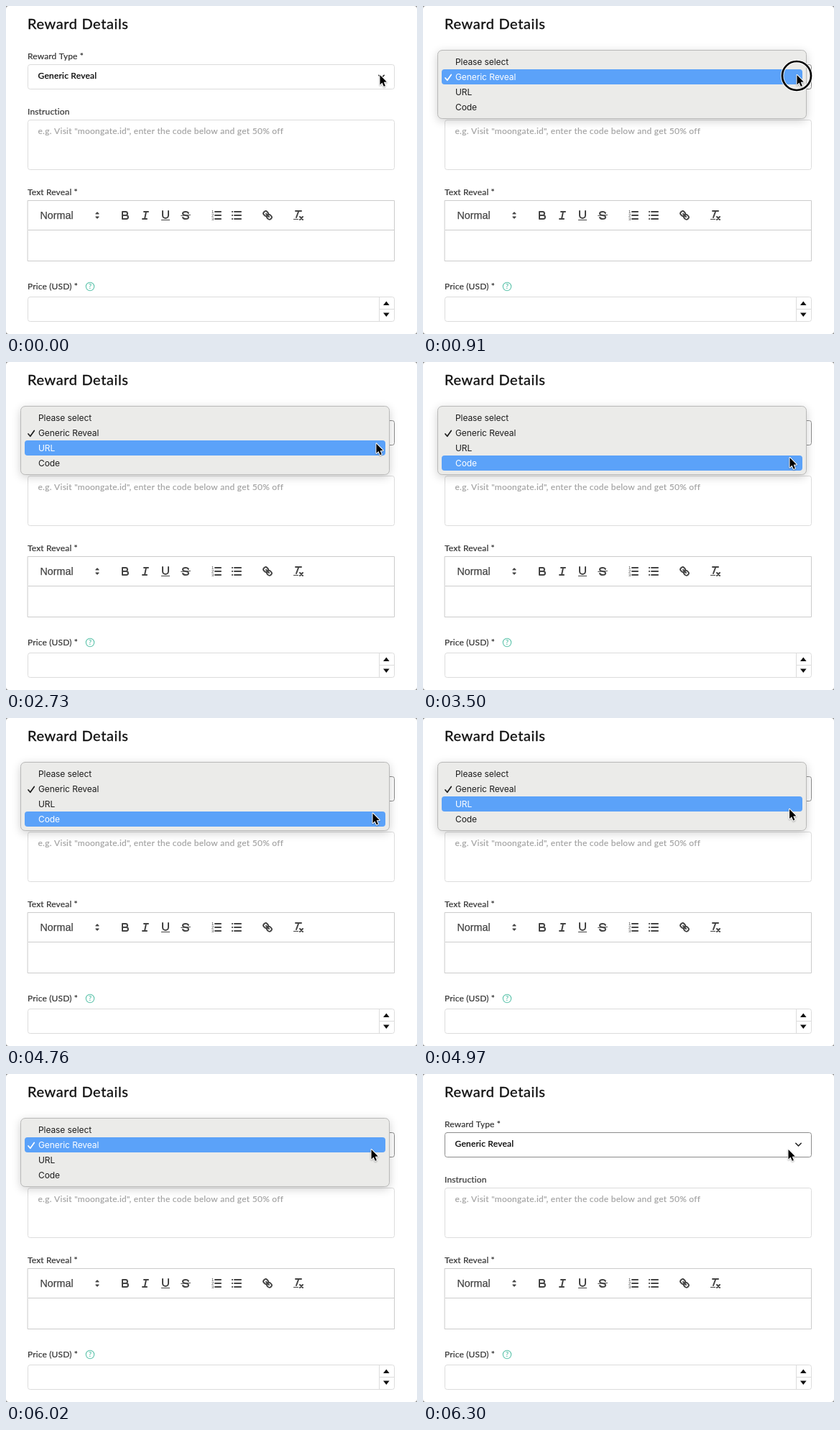
An HTML page with a canvas that plays this animation: 572 by 456 pixels, repeating every 8.4 s.

```html
<!DOCTYPE html>
<html lang="en">
<head>
<meta charset="utf-8">
<title>Reward Details</title>
<style>
html, body { margin: 0; width: 100%; height: 100%; overflow: hidden; background: #fff; }
canvas { display: block; width: 572px; height: 456px; }
</style>
</head>
<body>
<canvas id="stage"></canvas>
<script>
const W = 572, H = 456, LOOP = 8400, STEP = 70;
const canvas = document.getElementById('stage');
const ctx = canvas.getContext('2d');
const dpr = window.devicePixelRatio || 1;
canvas.width = W * dpr;
canvas.height = H * dpr;

const UI = 'Lato, sans-serif';
const MENU = 'Inter, sans-serif';
const SANS = '"Liberation Sans", Arial, sans-serif';
const INK = '#444', EDGE = '#dcdcdc';

const OPTIONS = ['Please select', 'Generic Reveal', 'URL', 'Code'];
const ROW_TOP = 67, ROW_H = 21;

// Pointer rest points: time, x, y
const PATH = [
  [0, 520.5, 96], [1680, 520.5, 96], [2100, 515.5, 112],
  [2170, 515.5, 112], [2240, 515.5, 113], [2660, 515.5, 113],
  [3500, 510.5, 133], [4690, 510.5, 133], [5600, 508.5, 105]
];

const BOLD = new Path2D('M5 4H9.5a2.5 2.5 0 0 1 0 5H5ZM5 9h5.5a2.5 2.5 0 0 1 0 5H5Z');
const ITALIC = new Path2D('M7 4H13M5 14H11M8 14L10 4');
const UNDER = new Path2D('M5 3V9a4 4 0 0 0 8 0V3');
const STRIKE = new Path2D('M12.9 6C12.4 4.8 10.8 4 9 4C6.8 4 5 5.1 5 6.5C5 8 6.3 8.7 9 9C11.7 9.3 13 10 13 11.5C13 12.9 11.2 14 9 14C7.2 14 5.6 13.2 5.1 12');
const LINK = new Path2D('M7 7L11 11M8.9 4.6a3.5 3.5 0 0 1 .4 4.7A3.5 3.5 0 0 1 4.6 8.9C3.2 7.5 2 6.4 4.2 4.2S7.5 3.2 8.9 4.6ZM13.4 9.1a3.5 3.5 0 0 0-4.7-.4a3.5 3.5 0 0 0 .4 4.7c1.4 1.4 2.5 2.5 4.7.4S14.8 10.5 13.4 9.1Z');
const CLEAR = new Path2D('M5 3H13M6 12L9.35 3');
const CROSS = new Path2D('M11 11L15 15M15 11L11 15');
const PICKER = new Path2D('M7 11L9 13L11 11ZM7 7L9 5L11 7Z');
const ARROW = new Path2D('M0 0V13.4L3 10.6L5.3 15.8L7.4 14.9L5.2 9.8L9.3 9.5Z');

function text(str, x, y, size, family, color, spacing = 0, weight = 0) {
  ctx.font = `${size}px ${family}`;
  ctx.letterSpacing = spacing + 'px';
  ctx.fillStyle = color;
  ctx.fillText(str, x, y);
  if (weight) {
    ctx.lineWidth = weight;
    ctx.strokeStyle = color;
    ctx.strokeText(str, x, y);
  }
}

function label(str, y) {
  text(str, 30, y, 12, UI, '#333', 0.15, 0.2);
}

function box(x, y, w, h, r, stroke, fill) {
  ctx.beginPath();
  ctx.roundRect(x, y, w, h, r);
  if (fill) {
    ctx.fillStyle = fill;
    ctx.fill();
  }
  if (stroke) {
    ctx.lineWidth = 1;
    ctx.strokeStyle = stroke;
    ctx.stroke();
  }
}

function poly(points, width, color, fill) {
  ctx.beginPath();
  points.forEach(([x, y]) => ctx.lineTo(x, y));
  if (fill) {
    ctx.fillStyle = color;
    ctx.fill();
    return;
  }
  ctx.lineWidth = width;
  ctx.strokeStyle = color;
  ctx.stroke();
}

function icon(x, draw) {
  ctx.save();
  ctx.translate(x, 282);
  ctx.lineWidth = 2;
  ctx.strokeStyle = ctx.fillStyle = INK;
  draw();
  ctx.restore();
}

function rows(x1, mark) {
  [4, 9, 14].forEach((y, i) => {
    poly([[x1, y], [15, y]], 2, INK);
    mark(y, i);
  });
}

function toolbar() {
  box(30.5, 270.5, 510, 84, 0, '#ccc');
  poly([[31, 311.5], [540, 311.5]], 1, '#ccc');
  text('Normal', 47.5, 296, 14.3, SANS, INK, 0, 0.25);
  icon(118, () => { ctx.fill(PICKER); ctx.lineWidth = 1.2; ctx.stroke(PICKER); });
  icon(157, () => ctx.stroke(BOLD));
  icon(185, () => ctx.stroke(ITALIC));
  icon(213, () => { ctx.stroke(UNDER); ctx.fillRect(3, 15, 12, 1); });
  icon(241, () => { ctx.stroke(STRIKE); poly([[2.5, 9.5], [15.5, 8.5]], 1, INK); });
  icon(284, () => rows(7, (y, i) => text(String(i + 1), 2, y + 2.2, 6, SANS, INK)));
  icon(312, () => rows(6, y => poly([[2.9, y], [3.1, y]], 2, INK)));
  icon(355, () => ctx.stroke(LINK));
  icon(398, () => { ctx.stroke(CLEAR); ctx.stroke(CROSS); ctx.fillRect(2, 14, 7, 1); });
}

function form(focused) {
  ctx.fillStyle = '#8a8a8a';
  ctx.fillRect(0, 0, W, H);
  box(0, 0, W, H, 4, null, '#fff');

  text('Reward Details', 30, 32, 20, UI, '#111', 0.62, 0.35);

  label('Reward Type *', 74);
  box(30.5, 81.5, 510, 34, 3, focused ? '#8c8c8c' : EDGE);
  text('Generic Reveal', 44.5, 101, 12, UI, '#000', 0.22, 0.25);
  poly([[518.8, 96.3], [522.5, 100], [526.2, 96.3]], 1.6, '#222');

  label('Instruction', 151);
  box(30.5, 158.5, 510, 69, 3, EDGE);
  text('e.g. Visit "moongate.id", enter the code below and get 50% off',
    44.5, 178, 12, UI, '#a0a0a0', 0.26, 0.15);

  label('Text Reveal *', 263);
  toolbar();

  label('Price (USD) *', 394);
  ctx.beginPath();
  ctx.arc(117, 390, 5.7, 0, Math.PI * 2);
  ctx.lineWidth = 1.1;
  ctx.strokeStyle = '#5cc3ab';
  ctx.stroke();
  ctx.textAlign = 'center';
  text('?', 117, 393.2, 9, UI, '#4dbda3', 0, 0.2);
  ctx.textAlign = 'left';

  box(30.5, 404.5, 510, 34, 3, EDGE);
  poly([[519.5, 405], [519.5, 438]], 1, EDGE);
  poly([[520, 421.5], [540, 421.5]], 1, EDGE);
  poly([[525, 416], [529.3, 410.5], [533.6, 416]], 0, '#111', true);
  poly([[525, 426.5], [529.3, 432], [533.6, 426.5]], 0, '#111', true);
}

function menu(active, alpha) {
  ctx.save();
  ctx.globalAlpha = alpha;
  ctx.save();
  ctx.shadowColor = 'rgba(0,0,0,.2)';
  ctx.shadowBlur = 13 * dpr;
  ctx.shadowOffsetY = 3 * dpr;
  box(20.5, 61.5, 513, 95, 6, null, '#ebebe9');
  ctx.restore();
  box(20.5, 61.5, 513, 95, 6, '#b9b9b8');
  if (active >= 0) box(26, ROW_TOP + active * ROW_H, 502, ROW_H, 4, null, '#5ba2f9');
  OPTIONS.forEach((name, i) => {
    const color = i === active ? '#fff' : '#1c1c1c';
    text(name, 45, 82 + i * ROW_H, 12, MENU, color, -0.08);
    if (i === 1) poly([[31, 100], [33.8, 103.3], [39.3, 95.5]], 1.7, color);
  });
  ctx.restore();
}

function ring(x, y) {
  ctx.beginPath();
  ctx.arc(x, y, 20, 0, Math.PI * 2);
  ctx.lineWidth = 4.6;
  ctx.strokeStyle = 'rgba(255,255,255,.8)';
  ctx.stroke();
  ctx.lineWidth = 2.7;
  ctx.strokeStyle = '#000';
  ctx.stroke();
}

function cursor(x, y) {
  ctx.save();
  ctx.translate(x, y);
  ctx.save();
  ctx.shadowColor = 'rgba(0,0,0,.3)';
  ctx.shadowBlur = 2 * dpr;
  ctx.shadowOffsetY = dpr;
  ctx.lineWidth = 2;
  ctx.strokeStyle = '#fff';
  ctx.stroke(ARROW);
  ctx.restore();
  ctx.fillStyle = '#000';
  ctx.fill(ARROW);
  ctx.restore();
}

function pointerAt(t) {
  const i = PATH.findIndex(p => p[0] > t);
  if (i < 0) return PATH[PATH.length - 1].slice(1);
  const [t0, x0, y0] = PATH[i - 1], [t1, x1, y1] = PATH[i];
  const p = (t - t0) / (t1 - t0);
  const e = p * p * (3 - 2 * p);
  return [x0 + (x1 - x0) * e, y0 + (y1 - y0) * e];
}

const within = (t, from, to) => t >= from && t < to;

function draw(time) {
  const t = Math.floor((time % LOOP) / STEP) * STEP;
  const [x, y] = pointerAt(t);
  ctx.setTransform(dpr, 0, 0, dpr, 0, 0);
  ctx.lineCap = ctx.lineJoin = 'round';

  form(t >= 840);
  if (within(t, 910, 6300)) {
    // The chosen row blinks once before the menu fades out
    const blink = within(t, 5950, 6020);
    const active = blink ? -1 : Math.floor((y - ROW_TOP) / ROW_H);
    menu(active, Math.min(1, (6300 - t) / 280));
  }
  if (within(t, 840, 980) || within(t, 5810, 5950)) ring(x - 0.5, y + 1);
  cursor(x, y);
}

let start;
function tick(now) {
  if (start === undefined) start = now;
  draw(now - start);
  requestAnimationFrame(tick);
}
draw(0);
requestAnimationFrame(tick);
</script>
</body>
</html>
```
